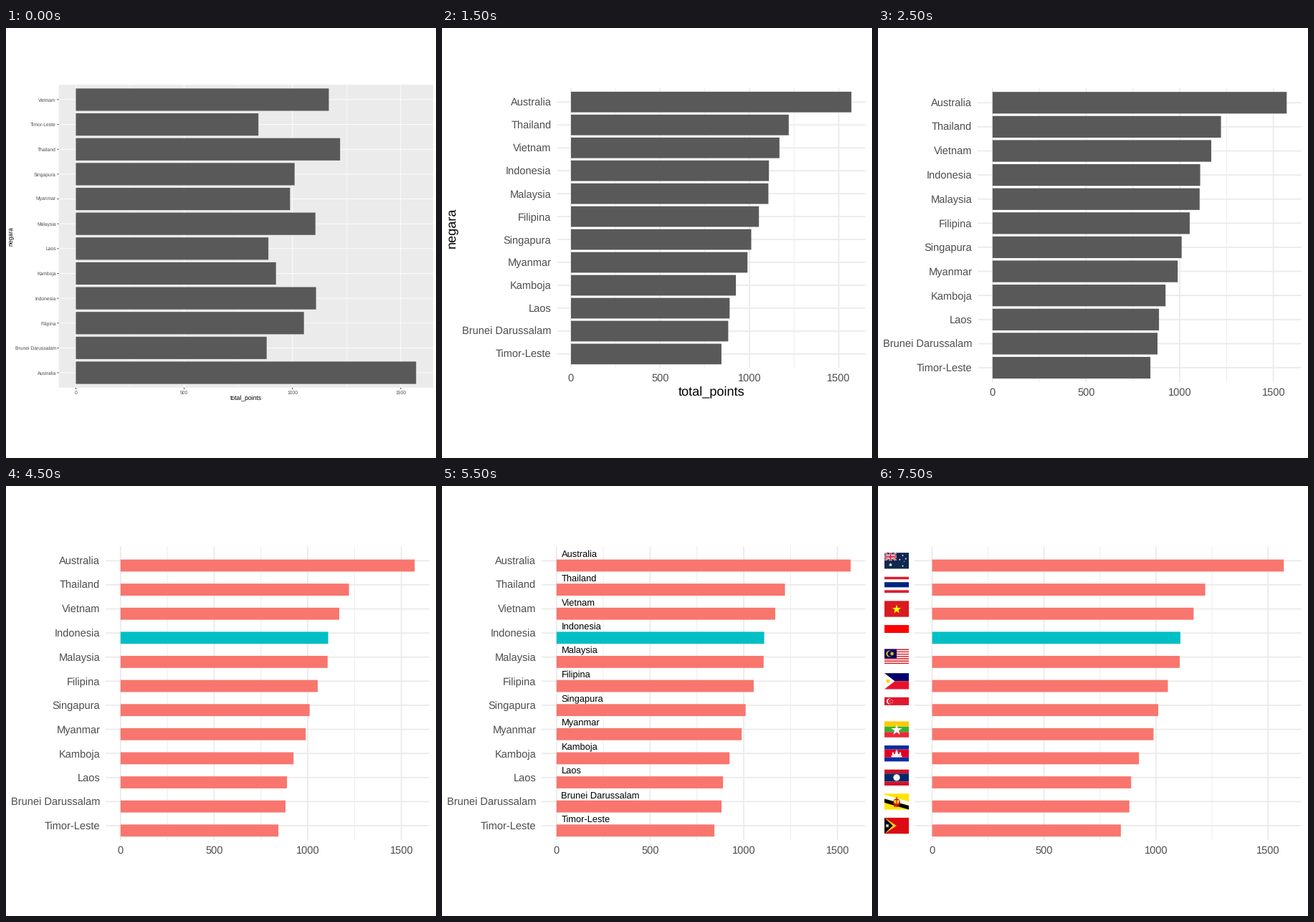
A matplotlib script that plays this animation: 600 by 600 pixels, repeating every 8 s.

```python
import numpy as np
import matplotlib.pyplot as plt
from matplotlib.animation import FuncAnimation
from matplotlib.patches import Circle, Polygon, Rectangle

plt.rcParams["font.family"] = "Liberation Sans"
plt.rcParams["text.hinting"] = "none"

SIZE, DPI = 600, 100
PT = 72 / DPI  # points per pixel

POINTS = {
    "Australia": 1571, "Thailand": 1220, "Vietnam": 1168, "Indonesia": 1109,
    "Malaysia": 1106, "Filipina": 1053, "Singapura": 1010, "Myanmar": 989,
    "Kamboja": 924, "Laos": 889, "Brunei Darussalam": 881, "Timor-Leste": 843,
}
CODES = dict(zip(POINTS, "au th vn id my ph sg mm kh la bn tl".split()))
RANKED = list(POINTS)
ALPHABETIC = sorted(POINTS, reverse=True)

GRAY, SALMON, TEAL = "#595959", "#F8766D", "#00BFC4"
GRID, AXIS_TEXT = "#EBEBEB", "#4D4D4D"
FLAG_W, FLAG_H = 34, 22.3

fig = plt.figure(figsize=(SIZE / DPI, SIZE / DPI), dpi=DPI, facecolor="white")
ax = fig.add_axes([0, 0, 1, 1])


def rect(x, y, w, h, color, z=2):
    patch = Rectangle((x, y), w, h, facecolor=color, linewidth=0, zorder=z, snap=False)
    return ax.add_patch(patch)


def line(x0, y0, x1, y1, color, width, z=1):
    return ax.plot([x0, x1], [y0, y1], color=color, lw=width * PT, zorder=z,
                   solid_capstyle="butt", snap=False)[0]


def text(x, y, s, px, color="black", ha="left", **kw):
    ax.text(x, y, s, fontsize=px * PT, color=color, ha=ha, va="baseline", zorder=5, **kw)


class Panel:
    """Plot area with a continuous x scale and twelve rows."""

    def __init__(self, left, right, top, bottom):
        self.left, self.right, self.top, self.bottom = left, right, top, bottom
        self.k = (right - left) / (1.1 * 1571)
        self.zero = left + 0.05 * 1571 * self.k
        self.pitch = (bottom - top) / 12.2

    def x(self, value):
        return self.zero + value * self.k

    def row(self, i):
        return self.top + (0.6 + i) * self.pitch

    def grid(self, color, width):
        for v in range(0, 1501, 250):
            w = width if v % 500 == 0 else width / 2
            line(self.x(v), self.top, self.x(v), self.bottom, color, w)
        for i in range(12):
            line(self.left, self.row(i), self.right, self.row(i), color, width)

    def bars(self, names, thin=False):
        for i, name in enumerate(names):
            color = GRAY
            if thin:
                color = TEAL if name == "Indonesia" else SALMON
            top = self.row(i) - (0.05 if thin else 0.45) * self.pitch
            height = (0.5 if thin else 0.9) * self.pitch
            rect(self.zero, top, POINTS[name] * self.k, height, color, 3)

    def x_labels(self, px, drop):
        for v in range(0, 1501, 500):
            text(self.x(v), self.bottom + drop, str(v), px, AXIS_TEXT, "center")

    def y_labels(self, labels, px, gap):
        for i, label in enumerate(labels):
            text(self.left - gap, self.row(i) + 0.365 * px, label, px, AXIS_TEXT, "right")


def titles(panel, px, x, y):
    mid = (panel.top + panel.bottom) / 2
    text((panel.left + panel.right) / 2, y, "total_points", px, ha="center")
    ax.text(x, mid, "negara", fontsize=px * PT, rotation=90, ha="right", va="center",
            zorder=5)


def minimal(panel, names, labels=None, thin=False):
    panel.grid(GRID, 1.8)
    panel.bars(names, thin)
    panel.x_labels(14.6, 18.9)
    if labels:
        panel.y_labels(labels, 14.6, 8)


# Flags

def star(x, y, r, color, points=5, inner=0.382, turn=0.0):
    a = np.arange(2 * points) * np.pi / points - np.pi / 2 + turn
    rad = np.where(np.arange(2 * points) % 2, r * inner, r)
    shape(np.c_[x + rad * np.cos(a), y + rad * np.sin(a)], color)


def shape(pts, color):
    ax.add_patch(Polygon(pts, facecolor=color, linewidth=0, zorder=6))


def disc(x, y, r, color):
    ax.add_patch(Circle((x, y), r, facecolor=color, linewidth=0, zorder=6))


def stripes(x, y, *bands):
    """Horizontal bands given as (share, color)."""
    total = sum(share for share, _ in bands)
    for share, color in bands:
        h = FLAG_H * share / total
        rect(x, y, FLAG_W, h, color, 6)
        y += h


def australia(x, y):
    stripes(x, y, (1, "#10284f"))
    w, h = 17, 11.2
    canton = rect(x, y, w, h, "#10284f", 6)
    for color, width in (("white", 2.4), ("#d8213b", 0.9)):
        for a, b in ((y, y + h), (y + h, y)):
            line(x, a, x + w, b, color, width, 6).set_clip_path(canton)
    for color, width in (("white", 3.6), ("#d8213b", 2)):
        line(x + w / 2, y, x + w / 2, y + h, color, width, 6)
        line(x, y + h / 2, x + w, y + h / 2, color, width, 6)
    star(x + 8.5, y + 16.8, 2.7, "white", 7, 0.45)
    for dx, dy, r in ((25.5, 3.8, 1.4), (21.4, 9.6, 1.4), (29.8, 8.4, 1.4),
                      (25.5, 18.4, 1.4), (27.4, 12.2, 0.8)):
        star(x + dx, y + dy, r, "white", 7, 0.45)


def thailand(x, y):
    red, white, blue = "#dc1c2e", "white", "#00247d"
    stripes(x, y, (1, red), (1, white), (2, blue), (1, white), (1, red))


def vietnam(x, y):
    stripes(x, y, (1, "#da1a20"))
    star(x + 17, y + 11.8, 6.6, "#ffff00")


def indonesia(x, y):
    stripes(x, y, (1, "#ff0000"), (1, "white"))


def malaysia(x, y):
    stripes(x, y, *[(1, "#d4141c"), (1, "white")] * 7)
    rect(x, y, 17, FLAG_H * 8 / 14, "#000066", 6)
    disc(x + 7, y + 6.4, 4.5, "#ffcc00")
    disc(x + 8.2, y + 6.4, 3.9, "#000066")
    star(x + 10.6, y + 6.4, 3.2, "#ffcc00", 14, 0.5)


def philippines(x, y):
    stripes(x, y, (1, "#00006b"), (1, "#e8112d"))
    shape([(x, y), (x + 14.5, y + FLAG_H / 2), (x, y + FLAG_H)], "white")
    star(x + 4.8, y + FLAG_H / 2, 3.6, "#f9d616", 8, 0.55)
    for dx, dy in ((1.2, 3), (1.2, 19.3), (12, 11.15)):
        star(x + dx, y + dy, 0.9, "#f9d616")


def singapore(x, y):
    stripes(x, y, (1, "#e0182d"), (1, "white"))
    disc(x + 7, y + 5.6, 4, "white")
    disc(x + 8.6, y + 5.6, 3.7, "#e0182d")
    for a in np.arange(5) * 2 * np.pi / 5 - np.pi / 2:
        star(x + 9.5 + 2.2 * np.cos(a), y + 5.7 + 2.2 * np.sin(a), 0.9, "white")


def myanmar(x, y):
    stripes(x, y, (1, "#fecb00"), (1, "#34b233"), (1, "#ea2839"))
    star(x + 17, y + 12, 8, "white")


def cambodia(x, y):
    stripes(x, y, (1, "#032ea1"), (2, "#e00025"), (1, "#032ea1"))
    rect(x + 9.5, y + 14.2, 15, 2.2, "white", 6)
    rect(x + 11, y + 12, 12, 2.4, "white", 6)
    for dx, top, w in ((12, 8.6, 1.6), (17, 6, 2.2), (22, 8.6, 1.6)):
        shape([(x + dx - w, y + 13), (x + dx - w * 0.6, y + top + 2), (x + dx, y + top),
               (x + dx + w * 0.6, y + top + 2), (x + dx + w, y + 13)], "white")


def laos(x, y):
    stripes(x, y, (1, "#ce1126"), (2, "#002868"), (1, "#ce1126"))
    disc(x + 17, y + FLAG_H / 2, 4.6, "white")


def brunei(x, y):
    stripes(x, y, (1, "#ffe600"))
    for color, top in (("white", 1.5), ("black", 7.2)):
        shape([(x, y + top), (x + FLAG_W, y + top + 9.6),
               (x + FLAG_W, y + top + 15), (x, y + top + 5.4)], color)
    red = "#cf1126"
    disc(x + 17, y + 12, 5, red)
    disc(x + 17, y + 10.6, 3.7, "#ffe600")
    rect(x + 16.4, y + 4.5, 1.2, 12, red, 6)
    rect(x + 14, y + 7.6, 6, 1.4, red, 6)
    rect(x + 13, y + 17, 8, 1.4, red, 6)


def timor(x, y):
    stripes(x, y, (1, "#dc0a12"))
    for tip, color in ((17, "#ffc726"), (11.6, "black")):
        shape([(x, y), (x + tip, y + FLAG_H / 2), (x, y + FLAG_H)], color)
    star(x + 4, y + FLAG_H / 2, 3.3, "white", turn=-0.35)


FLAGS = [australia, thailand, vietnam, indonesia, malaysia, philippines,
         singapore, myanmar, cambodia, laos, brunei, timor]

# Scenes

TITLED = Panel(160.4, 590.8, 84.1, 474.1)
WIDE = Panel(139.3, 590.8, 84.1, 494.2)


def default_theme():
    p = Panel(73.7, 596, 79.2, 501.8)
    rect(p.left, p.top, p.right - p.left, p.bottom - p.top, GRID, 0)
    p.grid("white", 0.9)
    p.bars(ALPHABETIC)
    for i in range(12):
        line(p.left - 2.3, p.row(i), p.left, p.row(i), "#333333", 0.9)
    for v in range(0, 1501, 500):
        line(p.x(v), p.bottom, p.x(v), p.bottom + 2.3, "#333333", 0.9)
    p.x_labels(6.8, 8.8)
    p.y_labels(ALPHABETIC, 6.8, 3.8)
    titles(p, 8.6, 11, 519.6)


def minimal_theme(names):
    minimal(TITLED, names, names)
    titles(TITLED, 18.2, 23, 512)


def no_titles():
    minimal(WIDE, RANKED, RANKED)


def highlight_legend():
    minimal(Panel(139.3, 488.8, 84.1, 494.2), RANKED, RANKED, thin=True)
    text(516, 278, "IDN", 18.2)
    for y, color, label in ((289, SALMON, "FALSE"), (302, TEAL, "TRUE")):
        rect(515.8, y, 12.4, 13, color)
        text(537.5, y + 12, label, 14.6)


def highlight(named=False):
    minimal(WIDE, RANKED, RANKED, thin=True)
    if named:
        for i, name in enumerate(RANKED):
            text(166.5, WIDE.row(i) - 5, name, 12.9)


def image_tags():
    tag = "<img src='https://www.example.com/img/flags/320px/{}.png' width='25' />"
    labels = [tag.format(CODES[name]) for name in RANKED]
    minimal(Panel(499, 590.8, 84.1, 494.2), RANKED, labels, thin=True)


def flag_labels():
    p = Panel(51, 590.8, 84.1, 494.2)
    minimal(p, RANKED, thin=True)
    for i, draw in enumerate(FLAGS):
        draw(9, p.row(i) - FLAG_H / 2)


# Each scene with its length in half seconds.
SCENES = [
    (default_theme, 1),
    (lambda: minimal_theme(ALPHABETIC), 2),
    (lambda: minimal_theme(RANKED), 2),
    (no_titles, 2),
    (highlight_legend, 2),
    (highlight, 2),
    (lambda: highlight(named=True), 2),
    (image_tags, 2),
    (flag_labels, 1),
]
TIMELINE = [scene for scene, length in SCENES for _ in range(length)]


def update(i):
    ax.clear()
    ax.set_xlim(0, SIZE)
    ax.set_ylim(SIZE, 0)
    ax.axis("off")
    TIMELINE[i]()
    return []


anim = FuncAnimation(fig, update, frames=len(TIMELINE), init_func=lambda: [],
                     interval=500, repeat=True, repeat_delay=0, blit=False)
plt.show()
```
